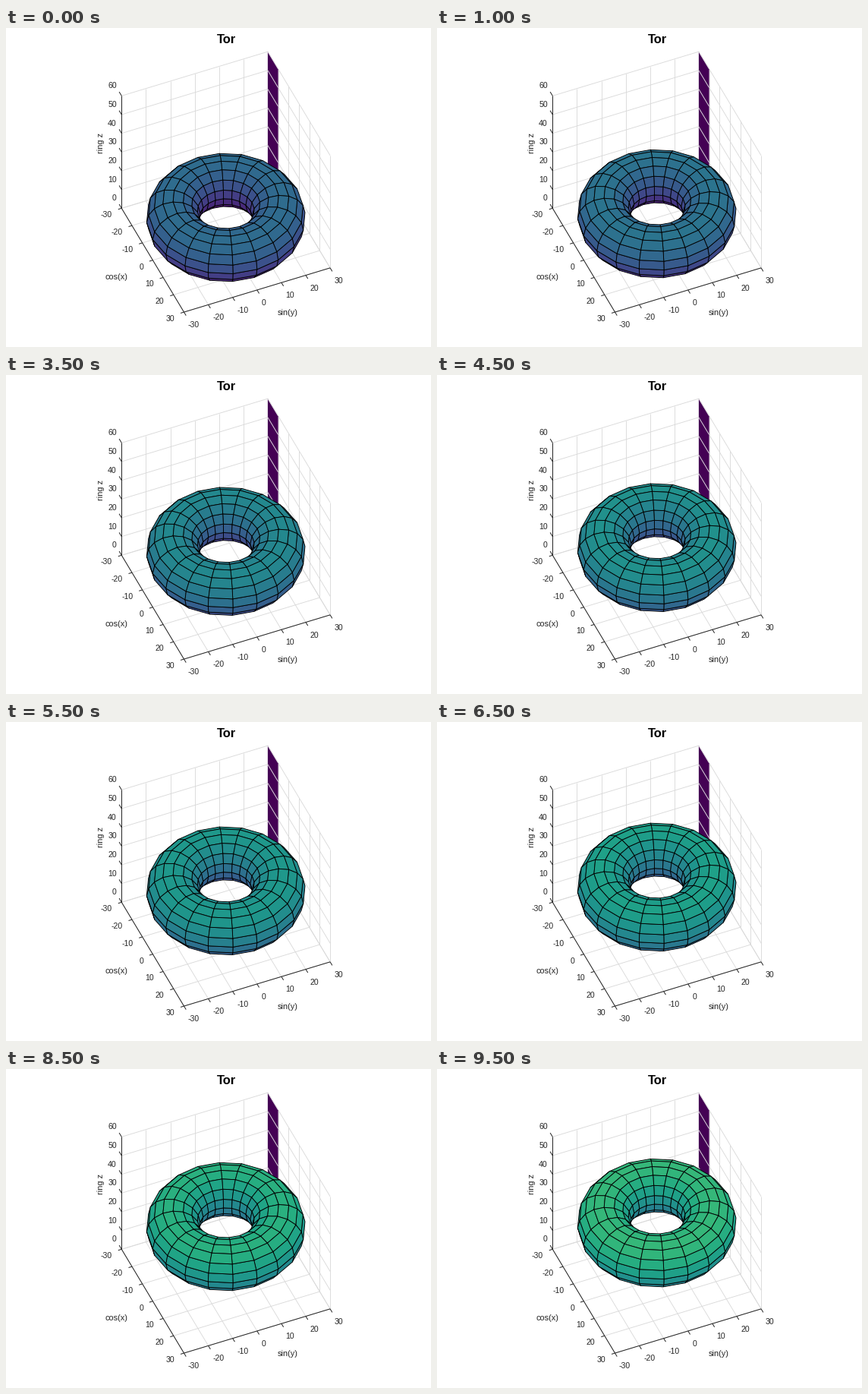
Recreate the animation shown at these times as a matplotlib script. Size 560 by 420 pixels, loop 10000 ms.

```python
import numpy as np
import matplotlib.pyplot as plt
from matplotlib.animation import FuncAnimation
from matplotlib.collections import LineCollection, PolyCollection

W, H, DPI = 560, 420, 100
PX = 72 / DPI
FRAMES, INTERVAL = 20, 500
DARK, GRID = "#262626", "#dadada"
RING, TUBE = 20, 10
RING_STEPS, TUBE_STEPS = 20, 16
Z_MAX = 60

plt.rcParams["font.family"] = "Liberation Sans"
plt.rcParams["axes.unicode_minus"] = False

# Orthographic view: screen position of the origin and of one unit per axis
ORIGIN = np.array([289.7, 276.6])
AXES = np.array([[82.2, 136.7], [192.6, -58.2], [0, -148]]) / 60
TO_VIEWER = np.array([0.651, -0.276, 0.707])


def project(points):
    return ORIGIN + np.asarray(points, float) @ AXES


def segments(pairs, color, width, zorder):
    lines = [project(pair) for pair in pairs]
    ax.add_collection(LineCollection(lines, colors=color, linewidths=width * PX,
                                     zorder=zorder))


def label(x, y, text, size=10.5, **style):
    style = {"ha": "center", "va": "center", "color": DARK, **style}
    ax.text(x, y, text, fontsize=size * PX, **style)


fig = plt.figure(figsize=(W / DPI, H / DPI), dpi=DPI, facecolor="white")
ax = fig.add_axes([0, 0, 1, 1])
ax.set_xlim(0, W)
ax.set_ylim(H, 0)
ax.axis("off")

# Floor and wall grids
ticks = range(-30, 31, 10)
heights = range(0, Z_MAX + 1, 10)
grid = []
for t in ticks:
    grid += [[(t, -30, 0), (t, 30, 0)], [(-30, t, 0), (30, t, 0)],
             [(-30, t, 0), (-30, t, Z_MAX)], [(t, 30, 0), (t, 30, Z_MAX)]]
for z in heights:
    grid += [[(-30, -30, z), (-30, 30, z)], [(-30, 30, z), (30, 30, z)]]
segments(grid, GRID, 0.9, 2)

# Narrow panel in the back corner, in front of the wall's vertical lines
panel = project([(-30, 30, 0), (-20, 30, 0), (-20, 30, Z_MAX), (-30, 30, Z_MAX)])
ax.add_collection(PolyCollection([panel], facecolors=[plt.cm.viridis(0.0)],
                                 edgecolors="none", zorder=2.2))
segments([[(-30, 30, z), (-20, 30, z)] for z in heights], "#e6e6e6", 0.9, 2.5)

# Axis lines, ticks and tick labels
axis_lines = [[(-30, -30, 0), (30, -30, 0)], [(30, -30, 0), (30, 30, 0)],
              [(-30, -30, 0), (-30, -30, Z_MAX)]]
for t in ticks:
    axis_lines += [[(t, -30, 0), (t, -31.4, 0)], [(30, t, 0), (32, t, 0)]]
    x, y = project((t, -30, 0))
    label(x - 12.5, y + 8, str(t), ha="right", va="center_baseline")
    x, y = project((30, t, 0))
    label(x + 5.5, y + 16, str(t), ha="left", va="center_baseline")
for z in heights:
    axis_lines.append([(-30, -30, z), (-32.3, -30, z)])
    x, y = project((-30, -30, z))
    label(x - 6.5, y - 14, str(z), ha="right", va="center_baseline")
segments(axis_lines, DARK, 1, 3)

label(290, 16, "Tor", 16.5, weight="bold", color="black")
label(145.5, 328, "cos(x)", 11)
label(371, 374.5, "sin(y)", 11)
label(124.5, 151.5, "ring z", 11, rotation=90)

# Torus mesh around z = 0
around = np.linspace(0, 2 * np.pi, RING_STEPS + 1)
tube = np.linspace(0, 2 * np.pi, TUBE_STEPS + 1)
t, p = np.meshgrid(around, tube, indexing="ij")
radius = RING + TUBE * np.cos(p)
mesh = np.stack([radius * np.cos(t), radius * np.sin(t), TUBE * np.sin(p)], axis=-1)
faces = np.stack([mesh[:-1, :-1], mesh[1:, :-1], mesh[1:, 1:], mesh[:-1, 1:]],
                 axis=2).reshape(-1, 4, 3)

# Keep the faces turned to the viewer, farthest first
normals = np.cross(faces[:, 2] - faces[:, 0], faces[:, 3] - faces[:, 1])
faces = faces[normals @ TO_VIEWER > 0]
faces = faces[np.argsort(faces.mean(axis=1) @ TO_VIEWER)]
face_z = faces[:, 2, 2]

torus = PolyCollection([], edgecolors="black", linewidths=0.9 * PX,
                       joinstyle="round", zorder=5)
ax.add_collection(torus)


def update(frame):
    lift = 11 + frame
    torus.set_verts(project(faces + [0, 0, lift]))
    torus.set_facecolor(plt.cm.viridis((face_z + lift) / Z_MAX))
    return [torus]


anim = FuncAnimation(fig, update, frames=FRAMES, interval=INTERVAL,
                     repeat=True, repeat_delay=0, blit=False)
plt.show()
```
